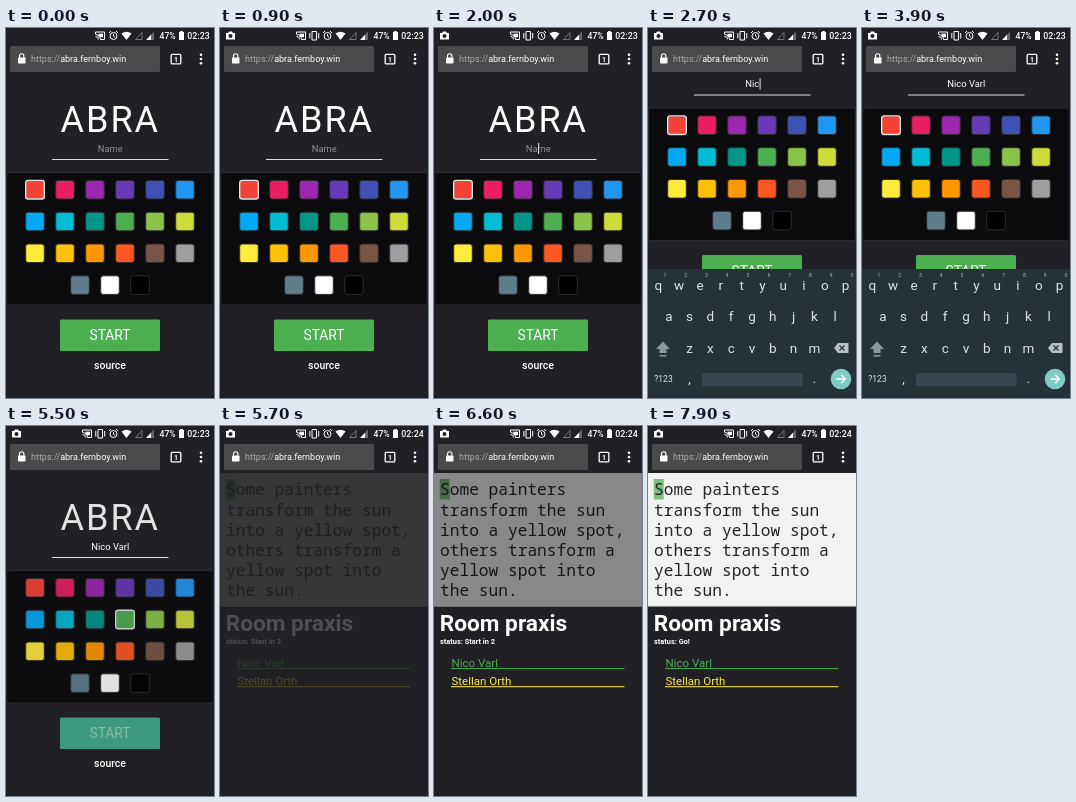
Animation, 208 px wide and 370 px high, one loop 8 s. Source, as an HTML page:

```html
<!DOCTYPE html>
<html lang="en">
<head>
<meta charset="utf-8">
<title>Typing race</title>
<style>
html, body { margin: 0; width: 100%; height: 100%; overflow: hidden; background: #212024; }
svg { display: block; width: 100vw; height: 100vh; font-family: Roboto, "Open Sans", sans-serif; }
.mid { text-anchor: middle; }
.mono { font: 16.2px "Noto Sans Mono", "DejaVu Sans Mono", monospace; white-space: pre; }
</style>
</head>
<body>
<svg id="stage" viewBox="0 0 208 370" fill="#fff"></svg>
<script>
const PLAYER = 'Nico Varl', RIVAL = 'Stellan Orth';
const KEY_TIMES = [2400, 2550, 2700, 2800, 2900, 3050, 3150, 3250, 3350];
const LOOP = 8000;
const COLORS = ('f44336 e91e63 9c27b0 673ab7 3f51b5 2196f3 03a9f4 00bcd4 009688 4caf50 8bc34a ' +
  'cddc39 ffeb3b ffc107 ff9800 ff5722 795548 9e9e9e 607d8b ffffff 000000').split(' ');
const QUOTE = ['Some painters', 'transform the sun', 'into a yellow spot,',
  'others transform a', 'yellow spot into', 'the sun.'];

const rect = (x, y, w, h, fill, more = '') =>
  `<rect x="${x}" y="${y}" width="${w}" height="${h}" fill="${fill}" ${more}/>`;
const text = (x, y, size, str, more = '') =>
  `<text x="${x}" y="${y}" font-size="${size}" ${more}>${str}</text>`;
const mid = (x, y, size, str, more = '') => text(x, y, size, str, `class="mid" ${more}`);
const path = (d, more = '') => `<path d="${d}" ${more}/>`;
const line = (d, width = 1, color = '#fff') => path(d, `fill="none" stroke="${color}" stroke-width="${width}"`);

function swatchPos(i) {
  const row = Math.floor(i / 6);
  return { x: (row === 3 ? 74 : 29) + 30 * (i % 6), y: 161.7 + 31.8 * row };
}

function swatch(color, i) {
  const { x, y } = swatchPos(i);
  return rect(x - 9.3, y - 9.3, 18.6, 18.6, '#' + color, 'rx="2.5" stroke="#2c2b2d" stroke-width="1"');
}

function statusBar() {
  return rect(0, 0, 208, 47, '#212024') +
    `<g id="camera">${path('M6 5h2l1-1.5h3L13 5h2v6.5H6z')}<circle cx="10.5" cy="8" r="2" fill="#212024"/></g>` +
    `<g id="cast">${line('M76.5 6V4h9v7.500h-4M76.500 8.500a3 3 0 0 1 3 3M76.500 6.500a5 5 0 0 1 5 5')}` +
    `${rect(79.5, 5.7, 4.5, 3.5, '#fff')}</g>` +
    `<g id="vibrate">${line('M92 3.500h4.500v8.500h-4.500zM89.800 5v5.500M98.700 5v5.500')}</g>` +
    '<circle cx="107.5" cy="8" r="3.5" fill="none" stroke="#fff"/>' +
    line('M107.500 6v2.200l1.500 1M103 5l2-2M112 5l-2-2') +
    path('M115.500 5.500Q120.500 1.800 125.500 5.500L120.500 12z') +
    line('M129.500 11.500h6.500v-7z', .8, '#8a898c') +
    path('M140 12h8V3.500z', 'fill="#68676a"') + path('M140 12h5V6.700z') +
    text(153.5, 11, 8.6, '47%', 'font-weight="500"') +
    path('M173 4h1.200V3h2.600v1H178v8h-5z') +
    text(181.3, 11, 8.8, '02:23', 'id="clock" font-weight="500"');
}

function toolbar() {
  return rect(4, 18, 150, 26, '#4a494c', 'rx="1.5"') +
    rect(12, 29.5, 7.5, 6, '#fff', 'rx=".8"') + line('M13.500 30v-2a2.200 2.200 0 0 1 4.400 0v2', 1.1) +
    text(25, 34.3, 9, '<tspan fill="#aaa9ac">https://</tspan>abra.fernboy.win') +
    rect(165.2, 26.3, 9.6, 9.6, 'none', 'rx="1" stroke="#fff" stroke-width="1.3"') +
    mid(170, 33.7, 7, '1', 'font-weight="700"') +
    [26.7, 31, 35.3].map(y => `<circle cx="195" cy="${y}" r="1.3"/>`).join('');
}

function lobby() {
  return `<g id="lobby"><g id="dim">
    ${text(54.5, 104, 36, 'ABRA', 'letter-spacing="2"')}
    ${rect(.5, 144.5, 207, 132.5, '#0b0a0c', 'rx="3" stroke="#2d2b2f"')}
    ${COLORS.map(swatch).join('')}
    ${rect(0, 0, 18.6, 18.6, 'none', 'id="ring" rx="2.5" stroke="#e4e4e4" stroke-width="1.4"')}
    ${rect(54, 291.5, 100, 31.5, '#4caf50', 'id="button" rx="1.5"')}
    ${mid(104, 312, 13.8, 'START', 'id="start"')}</g>
    ${mid(104.3, 123.8, 9.4, 'Name', 'id="name"')}
    ${rect(0, 115, .9, 11, '#fff', 'id="caret"')}
    ${rect(46, 131, 116.5, 1, '#dddddd')}
    ${mid(104, 341, 10.5, 'source', 'font-weight="500"')}</g>`;
}

function keyRow(keys, x0, y) {
  return [...keys].map((k, i) => mid(x0 + 20.8 * i, y, 13.5, k, 'class="key"').replace('class="mid" class="key"', 'class="mid key"')).join('');
}

function keyboard() {
  const digits = [...'1234567890'].map((d, i) => mid(16.8 + 20.8 * i, 249, 5, d, 'fill="#a8afb2"')).join('');
  return `<g id="keyboard" fill="#dfe3e5">${rect(0, 241, 208, 129, '#263238')}${digits}
    ${keyRow('qwertyuiop', 10.4, 262)}${keyRow('asdfghjkl', 20.8, 293)}${keyRow('zxcvbnm', 41.6, 325)}
    ${path('M15 313.500l7 7.500h-3.500v4h-7v-4H8zM11.500 327h7v1.500h-7z', 'fill="#8e989c"')}
    ${path('M186 320l4-5h10.500v10H190z', 'fill="#b9c0c3"')}
    ${line('M191.500 317.500l5 5m0-5l-5 5', 1.2, '#263238')}
    ${mid(15.5, 354, 8.5, '?123')}${mid(41.5, 355, 13, ',')}${mid(166.5, 355, 13, '.')}
    ${rect(54, 345, 100.5, 13, '#37474f', 'rx="1.5"')}
    <circle cx="193" cy="351" r="10.3" fill="#80cbc4"/>
    ${line('M188.500 351h8.500M193.300 347l4 4-4 4', 1.4)}</g>`;
}

function room() {
  const player = (y, color, name) => text(17.5, y, 11.5, name, `fill="${color}"`) + rect(17, y + 1.6, 173.5, 1, color);
  return `<g id="room">${rect(0, 47, 208, 133.5, '#f3f2f3')}${rect(5.7, 53, 10, 20.5, '#7ebe82')}
    ${QUOTE.map((s, i) => `<text class="mono" x="6" y="${69.3 + 20.2 * i}" fill="#242326">${s}</text>`).join('')}
    ${rect(0, 47, 208, 133.5, '#000', 'id="shade"')}
    ${text(5.7, 205, 22.7, 'Room praxis', 'font-weight="700"')}
    ${text(6, 217.7, 7.4, '', 'id="status" font-weight="700"')}
    ${player(240.5, '#4caf50', PLAYER)}${player(258.6, '#ffeb3b', RIVAL)}</g>`;
}

const stage = document.getElementById('stage');
stage.innerHTML = rect(0, 0, 208, 370, '#212024') + lobby() + room() + keyboard() + statusBar() + toolbar();
const el = {};
stage.querySelectorAll('[id]').forEach(n => el[n.id] = n);
const keys = [...stage.querySelectorAll('.key')].map(node => ({ node, low: node.textContent }));

const ramp = (t, a, b) => Math.min(1, Math.max(0, (t - a) / (b - a)));
const ease = u => 1 - (1 - u) ** 3;
const set = (node, attrs) => { for (const k in attrs) node.setAttribute(k, attrs[k]); };
const show = (node, on) => set(node, { visibility: on ? 'visible' : 'hidden' });
const write = (node, str) => { if (node.textContent !== str) node.textContent = str; };

function statusAt(t) {
  if (t >= 7100) return 'Go!';
  if (t >= 6900) return 'Start in 1';
  return t >= 6400 ? 'Start in 2' : 'Start in 3';
}

function drawName(t) {
  const count = KEY_TIMES.filter(k => t >= k).length;
  const typed = PLAYER.slice(0, count);
  write(el.name, typed || 'Name');
  set(el.name, { fill: typed ? '#fff' : '#918f94' });
  const since = t - (count ? KEY_TIMES[count - 1] : 1900);
  show(el.caret, t >= 1900 && t < 4300 && since % 1000 < 500);
  const end = typed ? 104.3 + el.name.getComputedTextLength() / 2 + .4 : 104.2;
  set(el.caret, { x: end });
  const caps = !typed || typed.endsWith(' ');
  keys.forEach(k => write(k.node, caps ? k.low.toUpperCase() : k.low));
}

function draw(t) {
  const early = t < 200;
  show(el.camera, !early);
  show(el.vibrate, !early);
  set(el.cast, { transform: `translate(${early ? 13 : 0} 0)` });
  write(el.clock, t < 5700 ? '02:23' : '02:24');

  const up = ease(ramp(t, 2050, 2300)) - ease(ramp(t, 4200, 4400));
  set(el.keyboard, { transform: `translate(0 ${130 * (1 - up)})` });
  set(el.lobby, { transform: `translate(0 ${-64.5 * up})`, display: t < 5700 ? 'inline' : 'none' });
  set(el.dim, { opacity: 1 - ramp(t, 5450, 5850) });
  drawName(t);

  const { x, y } = swatchPos(t < 4700 ? 0 : 9);
  set(el.ring, { x: x - 9.3, y: y - 9.3 });
  const pressed = t >= 5350;
  set(el.button, { fill: pressed ? '#43ad8c' : '#4caf50' });
  set(el.start, { fill: pressed ? '#9ed0bb' : '#fff' });

  set(el.room, { display: t >= 5700 ? 'inline' : 'none', opacity: ramp(t, 5650, 5900) });
  set(el.shade, { opacity: .44 * (1 - ramp(t, 7100, 7500)) });
  write(el.status, 'status: ' + statusAt(t));
}

const begin = performance.now();
function tick() {
  draw((performance.now() - begin) % LOOP);
  requestAnimationFrame(tick);
}
tick();
</script>
</body>
</html>
```
